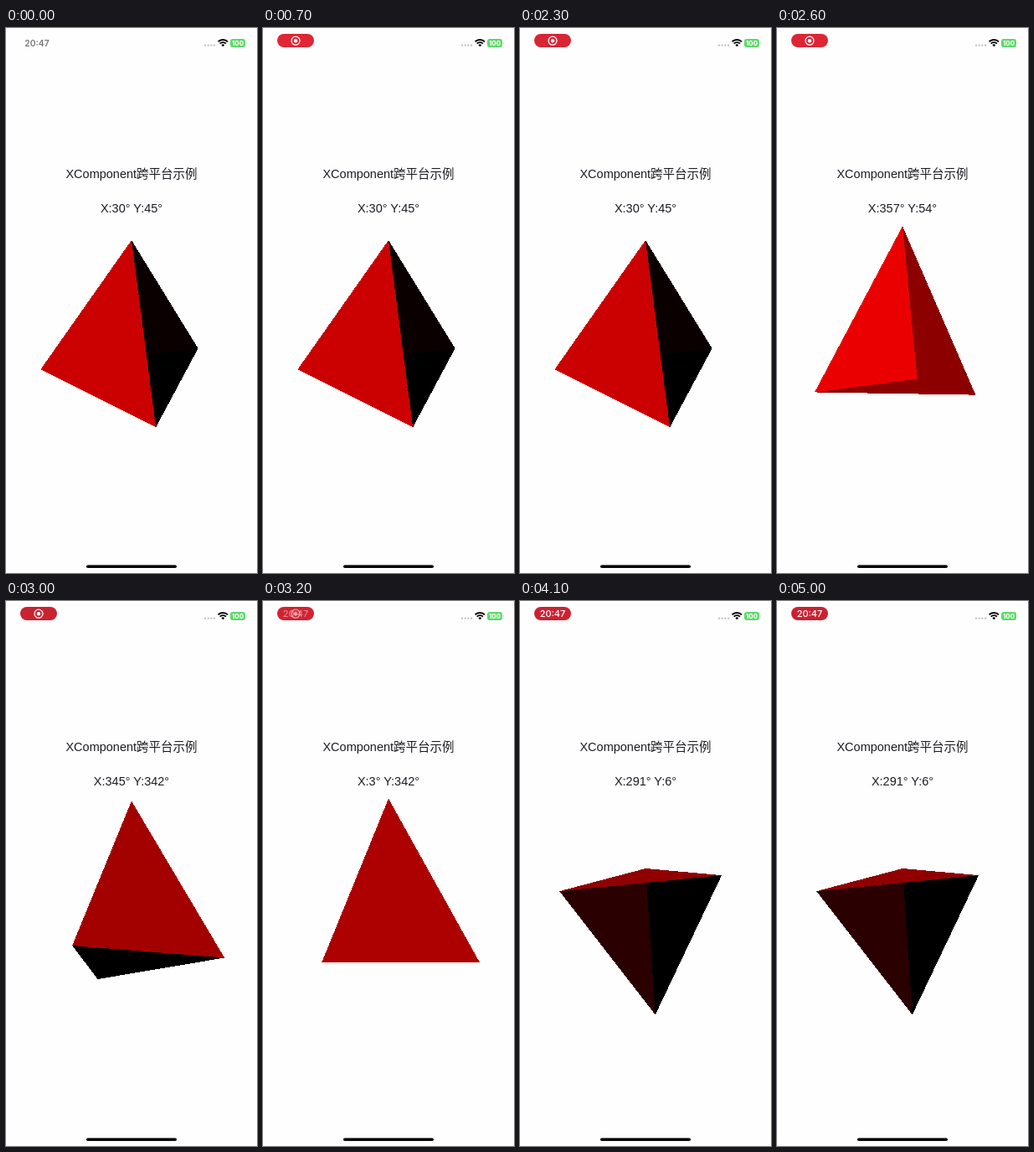
Animation, 300 px wide and 650 px high, one loop 5.3 s. Source, as an HTML page:

```html
<!DOCTYPE html>
<html lang="zh">
<head>
<meta charset="utf-8">
<style>
  html, body { margin: 0; width: 100%; height: 100%; overflow: hidden; background: #fefefe; }
  svg { display: block; }
  text { text-anchor: middle; }
  .label { font: 14.5px "Liberation Sans", "Noto Sans CJK SC", "Noto Sans CJK", sans-serif; fill: #1b1c24; }
  .status { font: 600 10.3px Inter, sans-serif; }
</style>
</head>
<body>
<svg width="300" height="650" viewBox="0 0 300 650">
  <text id="clock" class="status" x="37" y="21.8" fill="#777">20:47</text>
  <g id="pill">
    <rect id="pillBox" x="17" y="7" width="44" height="16" rx="8"/>
    <g id="recordIcon" fill="none" stroke="#fff" stroke-width="1.3">
      <circle cx="39" cy="15.2" r="5"/>
      <circle cx="39" cy="15.2" r="2.2" fill="#fff" stroke="none"/>
    </g>
    <text id="pillClock" class="status" x="39" y="19" fill="#fff" style="font-weight:500;font-size:11px">20:47</text>
  </g>

  <path d="M238 20.7h13" stroke="#bbb" stroke-width="2.2" stroke-linecap="round" stroke-dasharray="0 3.7"/>
  <g fill="none" stroke="#000" stroke-width="1.9">
    <path d="M253.6 16.4a8 8 0 0 1 11.4 0M255.7 18.7a5 5 0 0 1 7.2 0"/>
    <path d="M257.4 20.3a2.7 2.7 0 0 1 3.8 0l-1.9 2z" fill="#000" stroke="none"/>
  </g>
  <rect x="268" y="13" width="18" height="10" rx="3" fill="#5fd86b"/>
  <path d="M287 16.5q1.6 1.5 0 3z" fill="#5fd86b"/>
  <text x="277" y="20.9" fill="#fff" style="font:700 8px Inter,sans-serif">100</text>

  <text class="label" x="150" y="179">XComponent跨平台示例</text>
  <text id="angles" class="label" x="150" y="220"></text>
  <g id="pyramid" shape-rendering="crispEdges"></g>
  <rect x="96" y="640.5" width="108" height="3.6" rx="1.8"/>
</svg>
<script>
const LOOP = 5300, STEP = 100, TICK = 1000 / 60;
const CENTER = { x: 150, y: 365.6 }, SIDE = 195;
const APEX = SIDE * 2 / 3, BASE = -SIDE / 3, RADIUS = SIDE / Math.sqrt(3);
const LIGHT = [-0.47, 0.46, 0.72];

// Drag path: each pointer tick turns an axis by 3 degrees, up or down
const TURN_X = [[2417, 30], [2833, -45], [3150, 12], [3600, -69]];
const TURN_Y = [[2417, 45], [2533, 66], [3100, -36], [3467, 30], [3600, 6]];

// Faces are painted in this order without depth test; the second is wound inside out
const FACES = [
  { from: 60, normal: 120, sign: 1 },
  { from: 180, normal: 240, sign: -1 },
  { from: 300, normal: 0, sign: 1 },
];

const $ = id => document.getElementById(id);
const rad = deg => deg * Math.PI / 180;
const ramp = (t, start, end) => Math.min(1, Math.max(0, (t - start) / (end - start)));

for (const face of FACES) {
  face.el = document.createElementNS("http://www.w3.org/2000/svg", "polygon");
  $("pyramid").append(face.el);
}

function angleAt(keys, t) {
  let value = keys[0][1];
  for (let i = 1; i < keys.length; i++)
    value += (keys[i][1] - keys[i - 1][1]) * ramp(t, keys[i - 1][0], keys[i][0]);
  return Math.round(value / 3) * 3;
}

// Point at an azimuth around the vertical axis, then tilted
function rotate(azimuth, radius, height, tilt) {
  const a = rad(azimuth), s = Math.sin(rad(tilt)), c = Math.cos(rad(tilt));
  const z = radius * Math.cos(a);
  return [radius * Math.sin(a), height * c - z * s, height * s + z * c];
}

function drawPyramid(tilt, turn) {
  const project = (azimuth, radius, height) => {
    const [x, y] = rotate(azimuth - turn, radius, height, tilt);
    return `${(CENTER.x + x).toFixed(2)},${(CENTER.y - y).toFixed(2)}`;
  };
  for (const { from, normal, sign, el } of FACES) {
    const n = rotate(normal - turn, 0.961, 0.277, tilt);
    const lit = sign * n.reduce((sum, v, i) => sum + v * LIGHT[i], 0);
    el.setAttribute("points", [project(0, 0, APEX), project(from, RADIUS, BASE), project(from + 120, RADIUS, BASE)].join(" "));
    el.setAttribute("fill", `rgb(${Math.round(255 * Math.max(0, lit))},0,0)`);
  }
}

function drawStatus(t) {
  const shown = ramp(t, 0, 400), swap = ramp(t, 3050, 3400);
  const glow = t < 1300 ? 1 : 0.5 - 0.5 * Math.cos(t / 1000 * 2 * Math.PI);
  $("clock").style.opacity = 1 - shown;
  $("pill").style.opacity = shown;
  $("pillBox").setAttribute("fill", `rgb(${202 + 20 * glow},${34 + 4 * glow},${49 + 4 * glow})`);
  $("recordIcon").style.opacity = 1 - swap;
  $("pillClock").style.opacity = swap;
}

function frame(now) {
  const t = Math.min(5000, Math.floor(now % LOOP / STEP) * STEP);
  const show = keys => (angleAt(keys, t) + 360) % 360;
  $("angles").textContent = `X:${show(TURN_X)}° Y:${show(TURN_Y)}°`;
  // The drawing runs one tick ahead of the label
  drawPyramid(angleAt(TURN_X, t + TICK), angleAt(TURN_Y, t + TICK));
  drawStatus(t);
  requestAnimationFrame(() => frame(performance.now() - start));
}
const start = performance.now();
frame(0);
</script>
</body>
</html>
```
